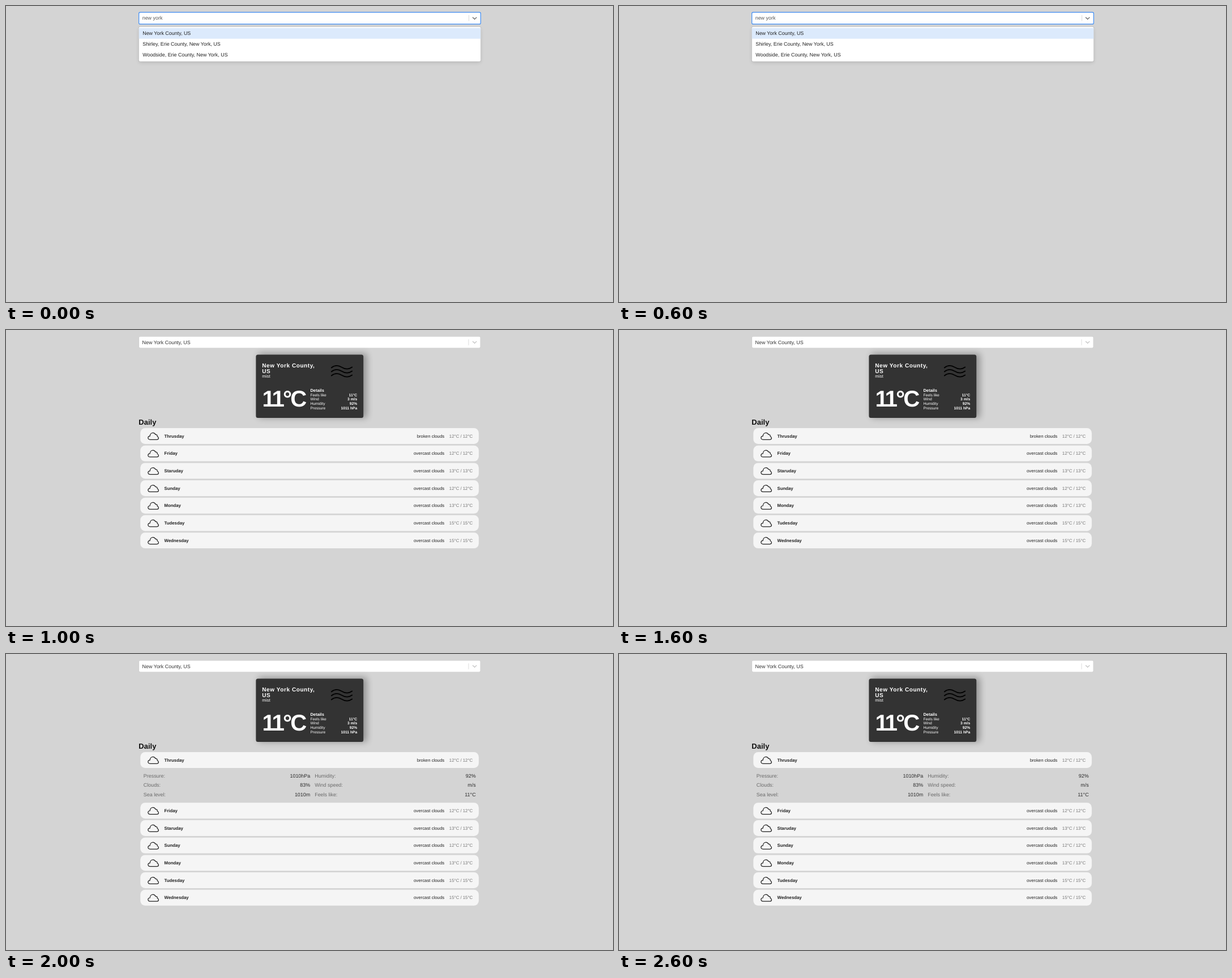
Animation of 1072x522 px, one loop 3 s. Source, as an HTML page:

```html
<!DOCTYPE html>
<html lang="en">
<head>
<meta charset="utf-8">
<title>Weather search</title>
<style>
  html, body { margin: 0; width: 100%; height: 100%; overflow: hidden; background: #d4d4d4; }
  svg { display: block; width: 1072px; height: 522px; }
  text { font-family: "Liberation Sans", Arial, sans-serif; text-rendering: geometricPrecision; white-space: pre; }
  .blur { filter: blur(5.6px); }
  .soft { filter: blur(3px); }
</style>
</head>
<body>
<svg id="stage" viewBox="0 0 1072 522">
  <g id="search"></g>
  <g id="weather"></g>
</svg>
<script>
const NS = "http://www.w3.org/2000/svg";
const STEP = 1000, STEPS = 3;
const BASE = 8.93, SMALL = 7.8, TINY = 6.7;
const PITCH = 30.7, OPEN_SHIFT = 58.6;

function add(parent, tag, attrs = {}) {
  const el = document.createElementNS(NS, tag);
  for (const key in attrs) el.setAttribute(key, attrs[key]);
  return parent.appendChild(el);
}

function rect(parent, x, y, width, height, fill, rx = 0, extra = {}) {
  return add(parent, "rect", { x, y, width, height, fill, rx, ...extra });
}

function label(parent, str, x, y, size, fill, extra = {}) {
  const el = add(parent, "text", { x, y, "font-size": size, fill, ...extra });
  el.textContent = str;
  return el;
}

const BOLD = { "font-weight": 700 };
const END = { "text-anchor": "end" };

function line(parent, d, stroke, width, extra = {}) {
  return add(parent, "path", { d, stroke, "stroke-width": width, fill: "none", ...extra });
}

function arrow(parent, color) {
  line(parent, "M824.4 20.3l3.2 3.1 3.2-3.1", color, 1.3,
    { "stroke-linecap": "round", "stroke-linejoin": "round" });
}

function drawSearch(g) {
  rect(g, 234.7, 11.2, 603.6, 20.7, "#fff", 2.2, { stroke: "#3c8cf5", "stroke-width": 1.2 });
  label(g, "new york", 240.7, 24.3, BASE, "#555");
  rect(g, 817, 16, 0.7, 10.4, "#c8c8c8");
  arrow(g, "#666");

  rect(g, 234.7, 39, 603.6, 61, "#000", 2.2, { opacity: 0.12, class: "soft" });
  rect(g, 234.1, 36.1, 604.8, 62.2, "#000", 2.6, { opacity: 0.1 });
  rect(g, 234.7, 36.7, 603.6, 61, "#fff", 2.2);
  rect(g, 234.7, 38.8, 603.6, 18.9, "#dceafc");
  ["New York County, US", "Shirley, Erie County, New York, US", "Woodside, Erie County, New York, US"]
    .forEach((str, i) => label(g, str, 241.2, 51.2 + i * 19, BASE, "#222"));
}

function drawCard(g) {
  rect(g, 445.9, 41.3, 191.7, 113.8, "#000", 3.5, { opacity: 0.3, class: "blur" });
  rect(g, 441.4, 43.4, 189.8, 111.6, "#333", 3.5);

  const title = { ...BOLD, "letter-spacing": 0.56 };
  label(g, "New York County,", 452.2, 65.8, 10.05, "#fff", title);
  label(g, "US", 452.2, 75.9, 10.05, "#fff", title);
  label(g, "mist", 452.3, 84, SMALL, "#fff");
  label(g, "11°C", 452.4, 135, 40.2, "#fff", { ...BOLD, "letter-spacing": -2.9 });

  for (let i = 0; i < 3; i++) {
    line(g, "M574.8 66.4C581 61.5 587 62 593 65.7S605 70 611.2 65.6", "#000", 1.9,
      { transform: `translate(0 ${i * 7})`, "stroke-linecap": "round" });
  }

  label(g, "Details", 537.5, 108.8, 7.4, "#fff", BOLD);
  [["Feels like", "11°C"], ["Wind", "3 m/s"], ["Humidity", "92%"], ["Pressure", "1011 hPa"]]
    .forEach(([name, value], i) => {
      const y = 116.6 + i * 7.8;
      label(g, name, 537.5, y, TINY, "#fff");
      label(g, value, 620.2, y, TINY, "#fff", { ...BOLD, ...END });
    });
}

function drawDay(g, day, sky, temp, i) {
  const row = add(g, "g", { transform: `translate(0 ${173 + i * PITCH})` });
  rect(row, 237.3, 0, 597.6, 27.9, "#f5f5f5", 8.4);
  line(row, "M4.2 12.9C1.9 12.9 .7 11.5 .7 9.8C.7 8 2.2 6.9 4 6.8C4.2 3.2 6.6 1 9.3 1" +
    "C11.6 1 13.2 2.3 13.8 4.1C16 3.8 17.3 5.3 17 7.4C18.6 7.9 19.2 9 19.2 10.2" +
    "C19.2 11.9 18 12.9 16.4 12.9Z", "#222", 1.25,
    { transform: "translate(250.2 7.4)", "stroke-linejoin": "round" });
  label(row, day, 279.5, 16.6, SMALL, "#222", BOLD);
  label(row, sky, 774.2, 16.6, SMALL, "#222", END);
  label(row, `${temp}°C / ${temp}°C`, 824.2, 16.6, SMALL, "#757575", END);
}

function drawDetails(g) {
  [["Pressure:", "1010hPa", "Humidity:", "92%"],
   ["Clouds:", "83%", "Wind speed:", "m/s"],
   ["Sea level:", "1010m", "Feels like:", "11°C"]].forEach(([a, av, b, bv], i) => {
    const y = 217.5 + i * 16.75;
    label(g, a, 242.8, y, BASE, "#6a6a6a");
    label(g, av, 537.2, y, BASE, "#2a2a2a", END);
    label(g, b, 545.2, y, BASE, "#6a6a6a");
    label(g, bv, 829.6, y, BASE, "#2a2a2a", END);
  });
}

const search = document.getElementById("search");
const weather = document.getElementById("weather");

drawSearch(search);

rect(weather, 234.6, 11.3, 603.4, 20.6, "#ccc", 2.2);
rect(weather, 235.1, 11.8, 602.4, 19.6, "#fff", 1.8);
label(weather, "New York County, US", 240.6, 24.5, BASE, "#333");
rect(weather, 816.6, 16.4, 0.7, 10.4, "#ccc");
arrow(weather, "#c4c4c4");
drawCard(weather);
label(weather, "Daily", 234.3, 166.8, 13, "#111", BOLD);

const details = add(weather, "g");
const later = add(weather, "g");
drawDetails(details);
[["Thrusday", 12], ["Friday", 12], ["Staruday", 13], ["Sunday", 12],
 ["Monday", 13], ["Tudesday", 15], ["Wednesday", 15]].forEach(([day, temp], i) =>
  drawDay(i ? later : weather, day, i ? "overcast clouds" : "broken clouds", temp, i));

function show(el, on) {
  el.setAttribute("display", on ? "inline" : "none");
}

const start = performance.now();
function tick() {
  const step = Math.floor((performance.now() - start) / STEP) % STEPS;
  const open = step === 2;
  show(search, step === 0);
  show(weather, step > 0);
  show(details, open);
  later.setAttribute("transform", `translate(0 ${open ? OPEN_SHIFT : 0})`);
  requestAnimationFrame(tick);
}
tick();
</script>
</body>
</html>
```
